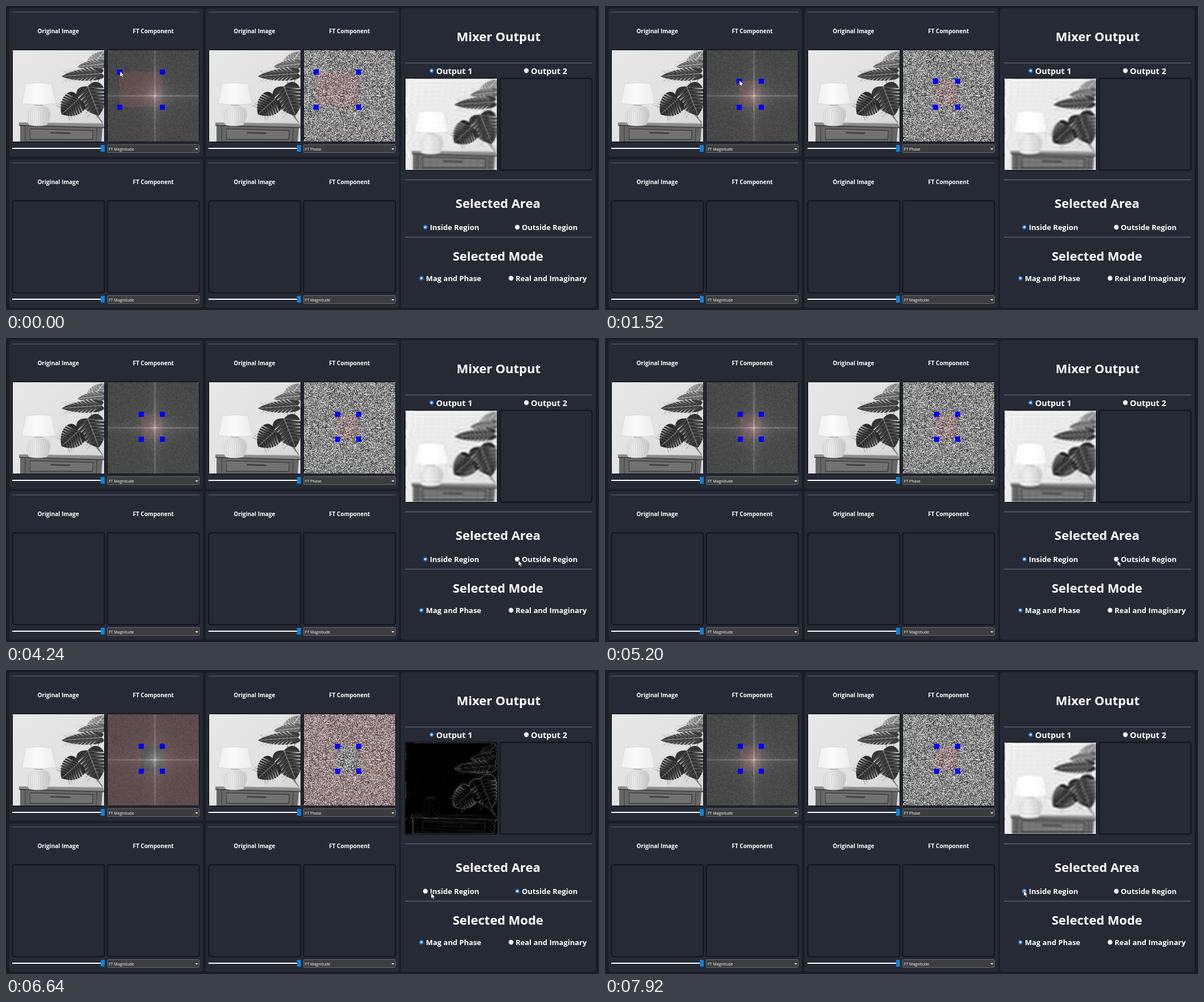
An HTML page with a canvas that plays this animation: 1045x536 px, repeating every 8000 ms.

```html
<!DOCTYPE html>
<html lang="en">
<head>
<meta charset="utf-8">
<title>Fourier mixer</title>
<style>
html, body { margin: 0; width: 100%; height: 100%; overflow: hidden; background: #1b1e27; }
canvas { display: block; }
</style>
</head>
<body>
<canvas id="stage" width="1045" height="536"></canvas>
<script>
const ctx = document.getElementById('stage').getContext('2d');
const N = 161, LOOP = 8000, STEP = 80;
const DC = { x: 83, y: 80 };
const DRAG_END = 1760, OUTSIDE_ON = 5440, INSIDE_OFF = 5680, OUTSIDE_OFF = 7840;
const FONT = '"Open Sans", "Noto Sans", sans-serif';
const gray = v => `rgb(${v},${v},${v})`;

function seeded(seed) {
  return () => {
    seed = (seed + 0x6D2B79F5) | 0;
    let r = Math.imul(seed ^ (seed >>> 15), 1 | seed);
    r = (r + Math.imul(r ^ (r >>> 7), 61 | r)) ^ r;
    return ((r ^ (r >>> 14)) >>> 0) / 4294967296;
  };
}

function layer(w, h, paint) {
  const c = document.createElement('canvas');
  c.width = w; c.height = h;
  const g = c.getContext('2d', { willReadFrequently: true });
  paint(g);
  return c;
}

function fromPixels(shade) {
  return layer(N, N, g => {
    const img = g.createImageData(N, N);
    for (let y = 0, i = 0; y < N; y++) for (let x = 0; x < N; x++, i += 4) {
      img.data[i] = img.data[i + 1] = img.data[i + 2] = shade(x, y);
      img.data[i + 3] = 255;
    }
    g.putImageData(img, 0, 0);
  });
}

function poly(g, fill, ...pts) {
  g.fillStyle = fill;
  g.beginPath();
  for (let i = 0; i < pts.length; i += 2) g.lineTo(pts[i], pts[i + 1]);
  g.fill();
}

function line(g, color, width, x1, y1, x2, y2) {
  g.strokeStyle = color; g.lineWidth = width;
  g.beginPath(); g.moveTo(x1, y1); g.lineTo(x2, y2); g.stroke();
}

// Split leaf from its base to its tip, w is half the width.
function leaf(g, x1, y1, x2, y2, w, tone, cuts = 6) {
  const len = Math.hypot(x2 - x1, y2 - y1);
  g.save();
  g.translate(x1, y1);
  g.rotate(Math.atan2(y2 - y1, x2 - x1));
  g.fillStyle = gray(tone);
  g.beginPath();
  g.moveTo(0, 0);
  g.bezierCurveTo(-len * .3, -w * 1.25, len * .6, -w * 1.45, len, 0);
  g.bezierCurveTo(len * .6, w * 1.45, -len * .3, w * 1.25, 0, 0);
  g.fill();
  for (const s of [-1, 1]) for (let i = 0; i < cuts; i++) {
    const x = len * (.02 + .84 * i / cuts), gap = len * .3 / cuts;
    line(g, gray(tone + 75), .7, x, 0, x + len * .17, s * w * .85);
    const m = x + len * .42 / cuts;
    poly(g, '#d8d8d8', m + len * .05, s * w * .3,
      m + len * .17, s * w * 1.15, m + len * .17 + gap, s * w * 1.1);
  }
  line(g, gray(tone + 100), 1, 0, 0, len * .95, 0);
  g.restore();
}

function paintDresser(g) {
  poly(g, '#666', 13, 131, 158, 136, 156, N, 13, N);
  poly(g, '#8a8a8a', 11, 127, 159, 129, 161, 136, 11, 132);
  line(g, '#a6a6a6', 1, 12, 127.5, 159, 129.5);
  line(g, '#373737', 1.5, 11, 132.5, 161, 136.5);
  poly(g, '#3d3d3d', 30, 138, 142, 141, 141, 158, 30, 158);
  poly(g, '#7b7b7b', 31, 139.5, 140.5, 142.5, 139.5, 156.5, 31.5, 156.5);
  for (let y = 143; y < 156; y += 3) line(g, 'rgba(50,50,50,.45)', .8, 32, y, 139, y + 2);
  poly(g, '#444', 66, 144, 101, 145, 100, 148, 67, 147);
  line(g, '#414141', 1.2, 22, 134, 22, N);
  line(g, '#414141', 1.2, 148, 137, 147, N);
}

function paintLamp(g) {
  g.fillStyle = '#b4b4b4'; g.fillRect(38, 94, 15, 6);
  const body = g.createLinearGradient(22, 0, 67, 0);
  body.addColorStop(0, '#dcdcdc');
  body.addColorStop(.4, '#f0f0f0');
  body.addColorStop(1, '#c9c9c9');
  g.fillStyle = body;
  g.beginPath();
  g.moveTo(36, 98);
  g.bezierCurveTo(20, 101, 20, 116, 29, 132);
  g.quadraticCurveTo(45, 135, 60, 132);
  g.bezierCurveTo(70, 116, 70, 101, 54, 98);
  g.fill();
  for (let i = -5; i <= 5; i++) {
    g.strokeStyle = 'rgba(140,140,140,.45)'; g.lineWidth = .7;
    g.beginPath(); g.moveTo(45 + i * 2, 99);
    g.quadraticCurveTo(45 + i * 4.8, 111, 45 + i * 2.8, 132); g.stroke();
  }
  const shade = g.createLinearGradient(16, 0, 76, 0);
  shade.addColorStop(0, '#f0f0f0');
  shade.addColorStop(.45, '#fbfbfb');
  shade.addColorStop(1, '#ededed');
  g.fillStyle = shade;
  g.beginPath();
  g.moveTo(23, 59); g.quadraticCurveTo(46, 56, 68, 59);
  g.lineTo(76, 94); g.quadraticCurveTo(46, 98, 16, 94);
  g.closePath();
  g.fill();
  g.strokeStyle = '#cecece'; g.lineWidth = .7; g.stroke();
}

function paintPhoto(g) {
  const wall = g.createLinearGradient(0, 0, N, N);
  wall.addColorStop(0, '#e8e8e8');
  wall.addColorStop(.55, '#e2e2e2');
  wall.addColorStop(1, '#d2d2d2');
  g.fillStyle = wall;
  g.fillRect(0, 0, N, N);

  g.strokeStyle = '#777'; g.lineWidth = 1.1;
  for (const [x, y] of [[118, 84], [131, 66], [155, 42], [139, 30]]) {
    g.beginPath(); g.moveTo(158, 128);
    g.quadraticCurveTo(134, 98, x, y); g.stroke();
  }
  leaf(g, 139, 29, 160, 2, 13, 130, 5);
  leaf(g, 160, 24, 114, 29, 9, 95, 6);
  leaf(g, 156, 41, 86, 46, 11, 60, 8);
  leaf(g, 132, 64, 152, 115, 25, 52, 7);
  leaf(g, 116, 86, 86, 113, 21, 42, 7);
  paintDresser(g);
  paintLamp(g);
}

const photo = layer(N, N, paintPhoto);
const photoData = photo.getContext('2d').getImageData(0, 0, N, N).data;
const luma = Float32Array.from({ length: N * N }, (_, i) => photoData[i * 4]);

const rndMag = seeded(7), rndPhase = seeded(21);
const magnitude = fromPixels((x, y) => {
  const dx = Math.abs(x - DC.x), dy = Math.abs(y - DC.y), d = Math.hypot(dx, dy);
  const cross = 54 * Math.exp(-dx * dx / .8 - dy / 120) + 54 * Math.exp(-dy * dy / .9 - dx / 120);
  const halo = 10 * Math.exp(-dx / 9) + 10 * Math.exp(-dy / 9);
  return 58 + 26 * rndMag() + cross + halo + 50 * Math.exp(-d / 17);
});
let held = 0;
const phase = fromPixels((x, y) => {
  if (Math.abs(y - DC.y) >= 2 || x % 4 === 0) held = 35 + 205 * rndPhase();
  return held;
});

// Kernel that keeps the frequencies from lo to hi along one axis.
function bandKernel(lo, hi) {
  const re = new Float32Array(N), im = new Float32Array(N);
  for (let n = 0; n < N; n++) for (let k = lo; k <= hi; k++) {
    re[n] += Math.cos(2 * Math.PI * k * n / N) / N;
    im[n] += Math.sin(2 * Math.PI * k * n / N) / N;
  }
  return { re, im };
}

function filterPhoto(box, outside) {
  const kx = bandKernel(box.x - DC.x, box.right - DC.x);
  const ky = bandKernel(box.y - DC.y, box.bottom - DC.y);
  const re = new Float32Array(N * N), im = new Float32Array(N * N);
  for (let y = 0; y < N; y++) for (let x = 0; x < N; x++) {
    let a = 0, b = 0;
    for (let j = 0, n = x; j < N; j++) {
      const v = luma[y * N + j];
      a += v * kx.re[n]; b += v * kx.im[n];
      n = n ? n - 1 : N - 1;
    }
    re[x * N + y] = a; im[x * N + y] = b;
  }
  return fromPixels((x, y) => {
    let a = 0, b = 0;
    for (let j = 0, n = y; j < N; j++) {
      const p = re[x * N + j], q = im[x * N + j], c = ky.re[n], s = ky.im[n];
      a += p * c - q * s; b += p * s + q * c;
      n = n ? n - 1 : N - 1;
    }
    return outside ? Math.hypot(luma[y * N + x] - a, b) * 1.25 - 8 : Math.hypot(a, b) * 1.03;
  });
}

const results = new Map();
function mixed(box, outside) {
  const key = [box.x, box.y, outside].join();
  if (!results.has(key)) results.set(key, filterPhoto(box, outside));
  return results.get(key);
}

function text(g, str, x, y, size, align = 'left', weight = 700) {
  g.font = `${weight} ${size}px ${FONT}`;
  g.textAlign = align;
  g.fillStyle = '#fff';
  g.fillText(str, x, y);
}

function rounded(g, x, y, w, h, r, fill, stroke, width = 2) {
  g.beginPath(); g.roundRect(x, y, w, h, r);
  g.fillStyle = fill; g.fill();
  if (stroke) { g.strokeStyle = stroke; g.lineWidth = width; g.stroke(); }
}

const slot = (g, x, y) => rounded(g, x, y, 162, 162, 4, '#252a34', '#10131a');

function channel(g, x, y, mode) {
  rounded(g, x, y, 341, 262, 5, '#252a34');
  line(g, '#505967', 1.3, x + 5, y + 6.7, x + 335, y + 6.7);
  text(g, 'Original Image', x + 86, y + 44, 10, 'center');
  text(g, 'FT Component', x + 253.5, y + 44, 10, 'center');
  slot(g, x + 5.5, y + 73.5);
  slot(g, x + 172.5, y + 73.5);
  line(g, '#fff', 2, x + 5, y + 247, x + 162, y + 247);
  g.fillStyle = '#1180d8';
  g.fillRect(x + 161, y + 241, 7, 12);
  rounded(g, x + 172.5, y + 240.5, 162, 14, 2, '#3d3d3f', '#68696c', 1);
  text(g, mode, x + 175, y + 250.5, 7, 'left', 400);
  poly(g, '#fff', x + 327.5, y + 247, x + 332.5, y + 247, x + 330, y + 249.7);
}

const backdrop = layer(1045, 536, g => {
  g.fillStyle = '#1a1d26';
  g.fillRect(0, 0, 1045, 536);
  channel(g, 6, 4, 'FT Magnitude');
  channel(g, 351.8, 4, 'FT Phase');
  channel(g, 6, 270, 'FT Magnitude');
  channel(g, 351.8, 270, 'FT Magnitude');
  rounded(g, 696, 4, 343, 528, 5, '#252a34');
  for (const y of [100.5, 306.5, 407.5]) line(g, '#566173', 1.3, 703, y, 1033, y);
  text(g, 'Mixer Output', 868, 61.5, 22, 'center');
  text(g, 'Selected Area', 867, 356, 22, 'center');
  text(g, 'Selected Mode', 867, 449, 22, 'center');
  text(g, 'Output 1', 758, 119.5, 14.4);
  text(g, 'Output 2', 925, 119.5, 14.4);
  text(g, 'Inside Region', 747, 395, 13);
  text(g, 'Outside Region', 909, 395, 13);
  text(g, 'Mag and Phase', 740, 485, 13);
  text(g, 'Real and Imaginary', 898, 485, 13);
  slot(g, 703.5, 127.5);
  slot(g, 870.5, 127.5);
  g.drawImage(photo, 12, 78);
  g.drawImage(photo, 358, 78);
});

function disc(x, y, r, fill) {
  ctx.fillStyle = fill;
  ctx.beginPath(); ctx.arc(x, y, r, 0, 7); ctx.fill();
}

function radio(x, y, on, ring = '#1d62b4') {
  disc(x, y, 4.2, on ? ring : '#f2f2f4');
  if (on) disc(x, y, 1.9, '#fff');
}

function component(img, x, y, box, outside) {
  ctx.save();
  ctx.translate(x, y);
  ctx.drawImage(img, 0, 0);
  ctx.fillStyle = 'rgba(255,100,100,.12)';
  ctx.beginPath();
  if (outside) ctx.rect(0, 0, N, N);
  ctx.rect(box.x, box.y, box.right - box.x, box.bottom - box.y);
  ctx.fill('evenodd');
  ctx.fillStyle = '#0000fa';
  for (const hx of [box.x, box.right]) for (const hy of [box.y, box.bottom])
    ctx.fillRect(hx - 4, hy - 4, 9, 9);
  ctx.restore();
}

function cursor(x, y) {
  ctx.save();
  ctx.translate(x, y);
  ctx.beginPath();
  for (const [px, py] of [[0, 0], [0, 10], [2.3, 8], [4, 11.5], [5.6, 10.7], [4.1, 7.4], [7, 7.2]]) ctx.lineTo(px, py);
  ctx.closePath();
  ctx.fillStyle = '#fff'; ctx.fill();
  ctx.strokeStyle = '#15151a'; ctx.lineWidth = .7; ctx.stroke();
  ctx.restore();
}

// time, x, y of the pointer
const track = [
  [0, 201, 115], [1520, 237, 131], [DRAG_END, 239, 133], [2160, 239, 133],
  [3040, 839, 282], [3920, 903, 392], [6080, 903, 392],
  [6640, 749, 393], [7040, 738, 389], [LOOP, 738, 389]
];

function pointer(t) {
  const i = track.findIndex(p => p[0] > t);
  const [t0, x0, y0] = track[i - 1], [t1, x1, y1] = track[i];
  const u = (t - t0) / (t1 - t0), e = t < DRAG_END ? u : u * u * (3 - 2 * u);
  return { x: x0 + (x1 - x0) * e, y: y0 + (y1 - y0) * e };
}

function draw(t) {
  const p = pointer(t), drag = pointer(Math.min(t, DRAG_END));
  const box = { x: Math.round(drag.x) - 180, y: Math.round(drag.y) - 77, right: 96, bottom: 100 };
  const outside = t >= OUTSIDE_ON && t < OUTSIDE_OFF;
  const inside = t < INSIDE_OFF || t >= OUTSIDE_OFF;

  ctx.drawImage(backdrop, 0, 0);
  component(magnitude, 179, 78, box, outside);
  component(phase, 525, 78, box, outside);
  ctx.drawImage(mixed(box, outside), 704, 128);

  radio(750, 114, true);
  radio(917, 114, false);
  radio(739, 390, inside, t >= OUTSIDE_ON ? '#4283d0' : undefined);
  radio(901, 390, outside);
  radio(732, 480, true);
  radio(890, 480, false);
  cursor(p.x, p.y);
}

const start = performance.now();
function frame() {
  const t = (performance.now() - start) % LOOP;
  draw(Math.floor(t / STEP) * STEP);
  requestAnimationFrame(frame);
}
draw(0);
requestAnimationFrame(frame);
</script>
</body>
</html>
```
